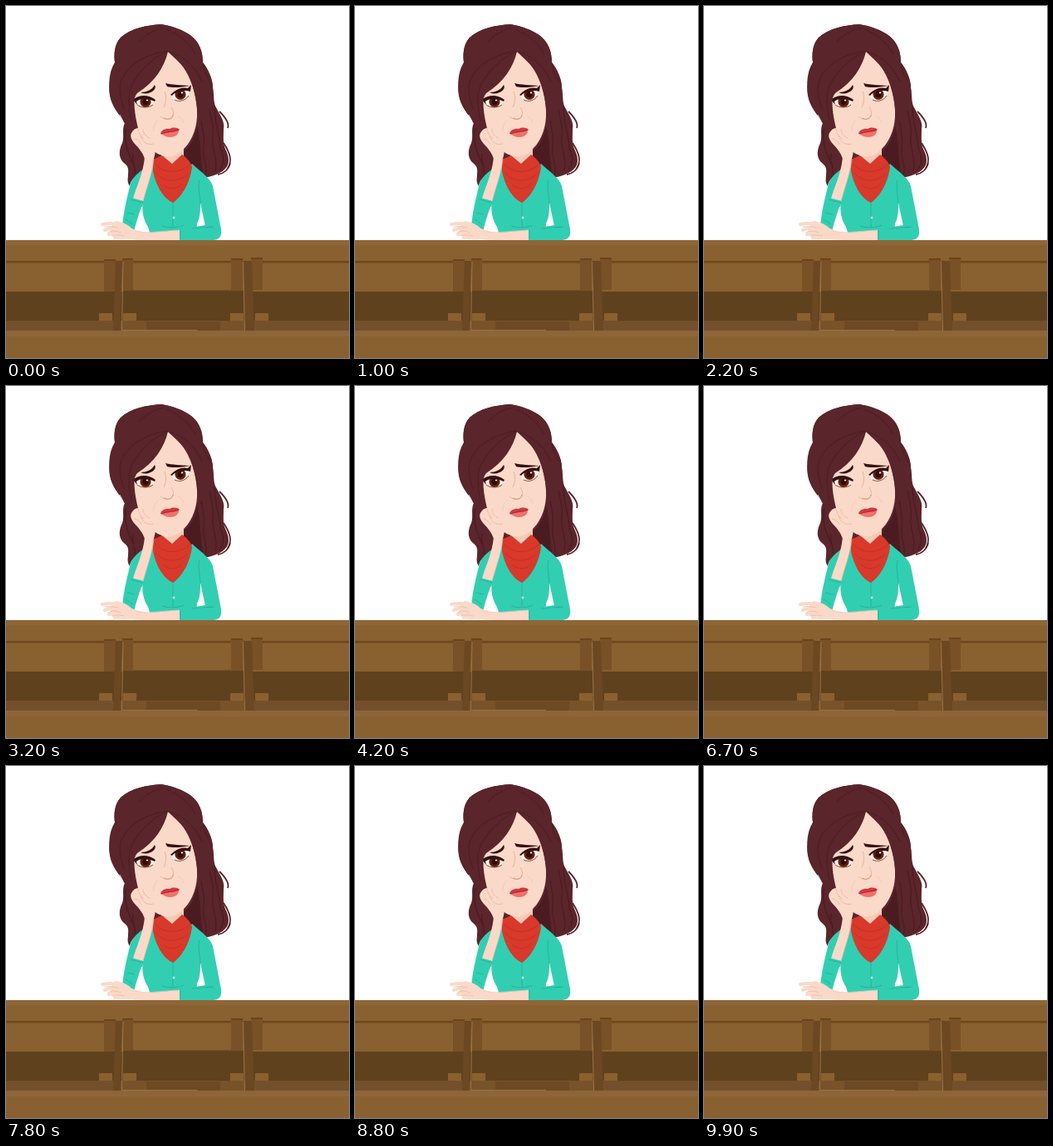
An HTML page with a canvas that plays this animation: 413 px wide and 424 px high, repeating every 10 s.

```html
<!DOCTYPE html>
<html lang="en">
<head>
<meta charset="utf-8">
<title>Tired at the desk</title>
<style>
html, body { margin: 0; width: 100%; height: 100%; overflow: hidden; background: #fff; }
canvas { display: block; width: 413px; height: 424px; }
</style>
</head>
<body>
<canvas id="stage"></canvas>
<script>
const W = 413, H = 424, LOOP = 10000;
const BLINK_FIRST = 1400, BLINK_GAP = 3500;
const canvas = document.getElementById('stage');
const ctx = canvas.getContext('2d');
const dpr = window.devicePixelRatio || 1;
canvas.width = W * dpr;
canvas.height = H * dpr;

const SKIN = '#fbd9c8', FOLD = '#eab9a4', HAIR = '#5a252b', STRAND = '#4b1b22';
const TEAL = '#32ceb2', SEAM = '#22ad98', RED = '#d8392b', DARK = '#351012';

const cache = {};
const path = d => cache[d] || (cache[d] = new Path2D(d));
function fill(d, color) {
  ctx.fillStyle = color;
  ctx.fill(path(d));
}
function line(d, color, width = 1) {
  ctx.strokeStyle = color;
  ctx.lineWidth = width;
  ctx.stroke(path(d));
}
function rect(x, y, w, h, color) {
  ctx.fillStyle = color;
  ctx.fillRect(x, y, w, h);
}
function oval(x, y, rx, ry, color) {
  ctx.fillStyle = color;
  ctx.beginPath();
  ctx.ellipse(x, y, rx, ry, 0, 0, Math.PI * 2);
  ctx.fill();
}
function group(dx, dy, draw) {
  ctx.save();
  ctx.translate(dx, dy);
  draw();
  ctx.restore();
}
function ramp(t, a, b) {
  const k = Math.min(1, Math.max(0, (t - a) / (b - a)));
  return k * k * (3 - 2 * k);
}
// 0 = eyes open, 1 = eyes shut
function blink(t) {
  const nearest = Math.max(0, Math.round((t - BLINK_FIRST) / BLINK_GAP));
  const away = Math.abs(t - BLINK_FIRST - nearest * BLINK_GAP);
  return 1 - ramp(away, 120, 300);
}

function backHair() {
  fill('M187 22C170 23 150 27 138 38C130 47 130 60 131 68C123 80 122 102 128 117C132 127 138 132 143 141C139 149 143 157 140 165C135 175 136 184 142 189C149 194 147 199 147 205C146 211 147 214 149 217C150 210 154 206 162 203L180 192L212 190L234 207C243 207 257 203 263 197C271 190 268 180 264 172C261 165 262 157 262 148C264 140 258 132 254 124C249 117 251 108 249 98C249 88 243 75 237 68C237 55 233 44 223 36C214 29 200 24 187 22Z', HAIR);
  fill('M213 176C222 170 228 158 230 145C235 160 233 178 238 206L224 192L214 184Z', STRAND);
  line('M234 120C232 140 241 151 238 171C236 184 244 192 240 205M243 107C242 127 252 142 249 158C247 173 256 183 252 199M251 122C252 149 259 160 258 171C264 184 262 190 257 198M145 147C141 162 147 177 153 190M153 178C151 188 157 195 155 203', STRAND, 1.2);
  line('M257 127C265 135 269 142 267 147M262 165C271 179 272 187 267 195M255 203C262 202 268 197 270 189', HAIR, 1.8);
}

function body() {
  fill('M187 172H214V182L200 193L187 184Z', '#f4cbb6');
  fill('M177 190C163 197 155 203 150 213C146 231 141 248 140 268L144 275L154 273C156 262 161 248 165 236C163 248 166 258 171 266L174 276H229L230 262C234 254 234 247 234 237L240 265L209 269V282H249C257 282 260 277 259 269L249 217C247 208 235 200 224 190L201 226Z', TEAL);
  line('M165 234C168 218 168 211 166 205M234 238C233 225 231 217 233 210M201 237V266M188 265C197 268 207 267 214 264M224 268L251 266M146 249L155 251M144 257L153 263', SEAM, .8);
  oval(202, 255, 1.4, 1.4, '#b9efe3');
  fill('M177 185L188 180L200 190L212 179C218 183 223 189 224 194C222 211 213 229 201 237C188 231 180 214 177 199Z', RED);
  line('M179 190C191 203 209 202 221 191M181 201C190 213 208 213 219 202M189 215C197 222 206 221 212 214', '#bd2f26', .8);
}

function forearm() {
  fill('M153 232C157 217 165 203 167 182L178 183C176 203 169 219 165 236Z', SKIN);
  line('M178 184C176 203 169 219 165 235', FOLD, .7);
  fill('M151 231L166 235L164 242L149 239Z', TEAL);
  line('M150 233L165 237', SEAM, .8);
}

function fist() {
  fill('M167 184C165 177 159 170 155 166C151 161 149 157 151 153C153 149 156 147 159 147C161 144 165 147 168 149C173 150 174 157 178 163C181 169 180 178 178 184Z', SKIN);
  line('M159 148C160 153 162 157 166 160M165 148C165 153 168 157 173 159M162 156C164 164 170 168 178 166M154 160C158 160 161 163 163 167', FOLD, .9);
}

function eyes(shut) {
  const left = 'M155 114C160 109 171 108 179 114C178 120 170 123 164 122C159 121 157 118 155 114Z';
  const right = 'M199 107C203 101 213 97 221 100C222 107 216 114 208 114C203 114 200 111 199 107Z';
  for (const [d, x, y] of [[left, 168, 115.5], [right, 210, 106.5]]) {
    ctx.save();
    ctx.clip(path(d));
    fill(d, '#fff8f4');
    oval(x, y, 6.6, 6.4, '#64220f');
    oval(x, y, 3.6, 3.8, '#2f0c08');
    oval(x + 2, y - 2, 1.1, 1.1, '#fff');
    // eyelids slide over the eyes
    if (shut > 0) rect(x - 16, y - 10, 32, 20 * shut, '#f6cbb9');
    ctx.restore();
  }
  if (shut < .55) {
    fill('M153 113C160 107 171 106 180 113L179 115C171 111 161 111 157 115L158 119Z', DARK);
    fill('M198 107C204 100 213 97 219 99L223 95L222 103C215 101 205 102 200 108Z', DARK);
    line('M158 119C163 123 172 123 177 119M203 113C209 116 216 114 220 108', '#7a3a2c', .9);
  } else {
    fill('M153 116C159 122 170 124 179 120L178 122C170 126 159 125 153 116Z', DARK);
    fill('M202 112C210 113 216 107 223 99C222 108 214 117 202 112Z', DARK);
    line('M157 113C164 110 172 111 177 115M202 106C207 102 214 100 218 101', '#dda08d', .8);
  }
}

function face(shut) {
  fill('M195 55C180 66 164 83 156 103C152 119 157 139 160 151C164 164 175 176 188 180C195 183 204 181 211 175C222 166 229 151 230 134C231 119 227 103 222 88C216 72 206 62 195 55Z', SKIN);
  line('M191 103C194 110 192 118 190 122M199 122C203 128 202 134 198 136C194 137 189 136 186 133', '#e3b196', .9);
  line('M190 135C196 138 200 135 201 131', '#cd9b7c', 1);
  line('M184 137C180 140 177 145 178 151M207 133C211 134 213 137 214 141', '#efc8b4', .8);
  eyes(shut);

  group(0, shut * 4, () => {
    fill('M162 104C169 104 176 101 179 95C181 98 179 102 174 104C170 106 166 106 162 104Z', DARK);
  });
  group(0, shut * 2.5, () => {
    fill('M192 93C200 95 210 95 222 96C211 98 201 99 194 97Z', DARK);
  });

  fill('M186 154C187 149 193 147 197 148C201 146 206 146 209 149C205 154 196 155 186 154Z', '#d03a40');
  fill('M187 154C194 152 202 152 208 150C208 155 203 158 198 158C193 158 190 156 187 154Z', '#f0706b');
  line('M187 154C194 151 201 152 208 149', '#a3242c', .8);
  if (shut > .2) line('M191 151C196 149 202 150 206 148', '#f2b4aa', .6 * shut);
}

function frontHair() {
  fill('M195 55C191 73 179 92 158 105C153 111 152 124 154 140L156 150C150 148 144 143 142 140C138 132 127 121 125 108C122 91 131 78 131 67C130 58 130 47 138 38C150 27 170 23 187 22C200 24 214 29 223 36C233 44 237 55 237 68C243 75 249 88 249 98L250 120L230 145C232 119 227 99 219 83C213 70 203 63 195 55Z', HAIR);
  line('M190 26C178 28 168 35 160 43M194 55C177 62 160 78 151 96C146 109 148 124 151 138M195 54C174 57 151 67 141 85C134 97 138 112 142 124M193 28C208 34 221 45 228 58M196 55C214 60 228 73 236 91M237 69C238 79 242 83 246 92', STRAND, .8);
  line('M137 131L141 139', '#fff', .8);
}

function restingHand() {
  fill('M209 270L174 273C165 273 158 270 151 268L139 278C151 283 177 282 209 282Z', SKIN);
  fill('M155 272C148 263 140 260 132 259C127 263 124 270 126 276L137 281L151 281Z', SKIN);
  ctx.lineCap = 'round';
  line('M136 263C128 261 121 262 116 263', SKIN, 4);
  line('M137 268C129 267 123 268 119 270', SKIN, 4);
  line('M139 274C132 273 127 274 124 275', SKIN, 4);
  line('M143 278C138 278 133 279 130.5 279', SKIN, 3.6);
  line('M119 266C125 265 130 266 135 267M123 273C128 270 134 271 138 273M128 277C134 275 138 276 142 277', FOLD, .8);
  line('M154 271C165 275 184 271 209 270', '#f0cbb7', .7);
  ctx.lineCap = 'butt';
  fill('M209 269L240 264L249 282H209Z', TEAL);
  line('M210 270V281M224 268L247 266', SEAM, .7);
}

function desk() {
  rect(0, 282, W, 142, '#89602f');
  rect(0, 282, W, 6, '#8f6637');
  rect(0, 307, W, 2.5, '#6f461e');
  rect(0, 344, W, 35, '#60411d');
  rect(141, 342.5, 145, 36.5, '#60411d');
  rect(0, 379, W, 12, '#73502b');
  rect(0, 391, W, 7, '#8d6538');
  rect(141, 379, 146, 12, '#785329');
  rect(169, 380, 89, 11, '#6d4924');

  for (const [x, y, w] of [[118, 305, 14], [140, 304, 13], [271, 304, 14], [295, 303, 14]]) {
    rect(x, y, w, 39, '#795126');
    rect(x, y, w, 2, '#6a431c');
  }
  for (const x of [112, 141, 270, 300]) rect(x, 370, 16, 9, '#8a602f');
  fill('M132 308H140L137 391H129Z', '#6b4722');
  fill('M285 308H296L299 391H288Z', '#6b4722');
  line('M141 308L139.5 391M285.5 308L287.5 391', '#a07a4c', .9);
  line('M140 390.5H230', '#a58056', .7);
}

function draw(now) {
  const shut = blink(now % LOOP);
  const dx = -.6 * shut, dy = shut;

  ctx.setTransform(dpr, 0, 0, dpr, 0, 0);
  rect(0, 0, W, H, '#fff');
  group(dx * .5, dy * .5, backHair);
  body();
  forearm();
  group(dx, dy, () => {
    face(shut);
    frontHair();
  });
  group(dx * .5, dy * .5, fist);
  restingHand();
  desk();
}

const start = performance.now();
function frame(now) {
  draw(Math.max(0, now - start));
  requestAnimationFrame(frame);
}
draw(0);
requestAnimationFrame(frame);
</script>
</body>
</html>
```
